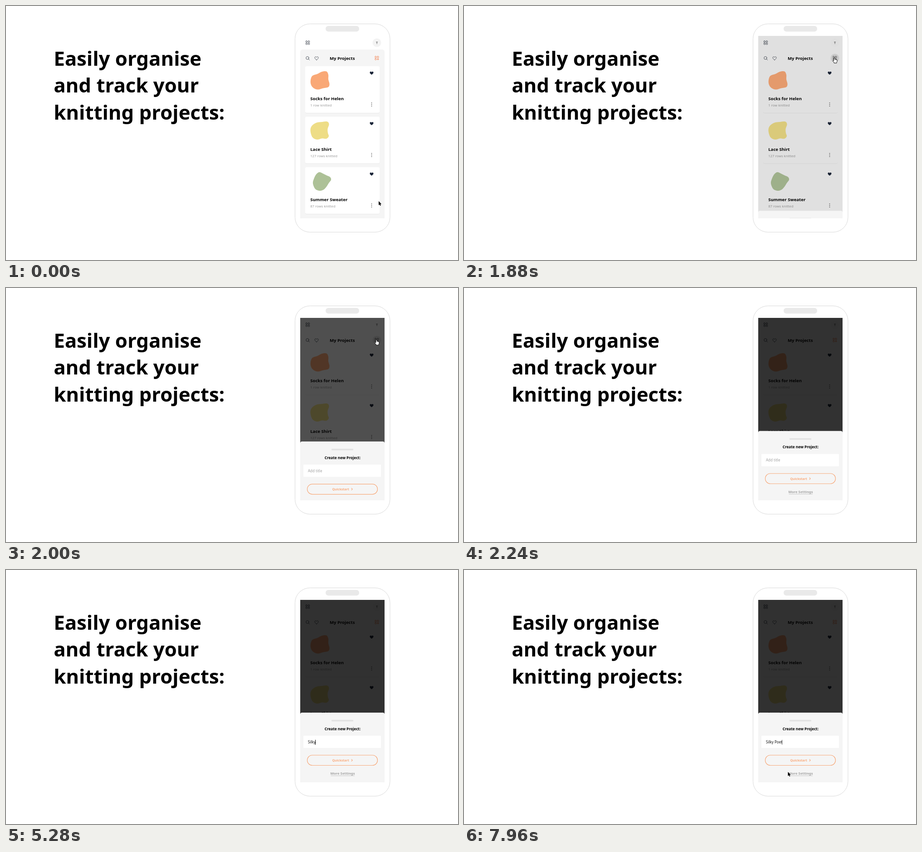
Animation of 997x561 px, one loop 8000 ms. Source, as an HTML page:

```html
<!DOCTYPE html>
<html lang="en">
<head>
<meta charset="utf-8">
<title>Knitting projects</title>
<style>
  html, body { margin: 0; width: 100%; height: 100%; overflow: hidden; background: #fff; }
  svg { display: block; width: 997px; height: 561px; font-family: "Noto Sans", "Open Sans", sans-serif; --paper: #fff; }
  text { white-space: pre; }
  .headline { font-size: 43.75px; font-weight: 700; }
  .name { font-size: 9.6px; font-weight: 600; }
  .rows { font-size: 7.7px; fill: #9c9c9c; }
  .paper { fill: var(--paper); }
  .line { fill: none; stroke: #444b55; stroke-width: .9; stroke-linecap: round; stroke-linejoin: round; }
  .mid { text-anchor: middle; }
  .hand, .arrow { stroke-linejoin: round; }
</style>
</head>
<body>
<svg viewBox="0 0 997 561" xmlns="http://www.w3.org/2000/svg">
  <defs>
    <clipPath id="screen"><rect x="649" y="66" width="186" height="403"/></clipPath>
    <path id="heart" d="M0 3.6C-2.6 1.6-4 .3-4-1.3-4-3.9-1.2-4.3 0-2.3 1.2-4.3 4-3.9 4-1.3 4 .3 2.6 1.6 0 3.6z"/>
  </defs>
  <g class="headline">
    <text x="105.2" y="131.5">Easily organise</text>
    <text x="105.2" y="191.3">and track your</text>
    <text x="105.2" y="251.2">knitting projects:</text>
  </g>
  <rect x="637.5" y="39.5" width="209.5" height="460" rx="33" fill="#fff" stroke="#dadada"/>
  <rect x="705" y="44" width="74" height="12.5" rx="6" fill="#e9e9e9"/>
  <g clip-path="url(#screen)">
    <rect class="paper" x="649" y="66" width="186" height="403"/>
    <path d="M649 469V102q0-6 6-6h174q6 0 6 6V469z" fill="#f5f5f5"/>
    <g class="line" id="menu" transform="translate(665.5 81)"></g>
    <circle cx="818" cy="81" r="9.5" fill="#f3f3f3"/>
    <text class="mid" x="818" y="83.7" font-size="7.5" font-weight="500" fill="#222">T</text>
    <g class="line">
      <circle cx="664.9" cy="114.8" r="3.2"/>
      <path d="M667.3 117.2l2.2 2.2"/>
      <use href="#heart" x="685" y="115.6"/>
    </g>
    <text class="name mid" x="741.7" y="118.7">My Projects</text>
    <circle id="hover" cx="818" cy="115" r="9.5" fill="#ddd"/>
    <g class="line" id="add" transform="translate(818 115)"></g>
    <g id="cards"></g>
    <rect id="shade" x="649" y="66" width="186" height="403"/>
    <g id="sheet">
      <path d="M649 472V319q0-4 4-4h178q4 0 4 4V472z" fill="#f5f5f5"/>
      <rect x="718" y="331" width="48" height="3.5" rx="1" fill="#e3e3e3"/>
      <text class="mid" x="742.5" y="353.6" font-size="8.2" font-weight="600">Create new Project:</text>
      <rect x="656" y="366" width="171" height="27" rx="1" fill="#fff"/>
      <text id="entry" x="666" y="382.7" font-size="8"></text>
      <rect id="caret" y="375" width="1" height="11"/>
      <rect id="button" x="664.5" y="409" width="155" height="22.5" rx="11.2" stroke="#f7aa7c" stroke-width="1.2"/>
      <text x="719.5" y="422.8" font-size="7" font-weight="600" fill="#f9ab7d">Quickstart</text>
      <path d="M761.8 417.8l2.3 2.4-2.3 2.4" fill="none" stroke="#f7a474" stroke-width="1.1"/>
      <text class="mid" x="742.5" y="452" font-size="7.8" font-weight="600" fill="#a3a3a3">More Settings</text>
      <path d="M716.5 454.5h52.5" stroke="#bbb" stroke-width=".8"/>
    </g>
  </g>
  <g id="cursor">
    <path class="arrow" d="M0 0V9L2 7.2 3.3 10.2 4.9 9.5 3.6 6.6H6.3z" stroke="#fff" stroke-width=".6" paint-order="stroke"/>
    <path class="hand" d="M-1.2.8Q0-.8 1.1.8V4Q2 3 3 4.2 4.1 3.6 4.7 4.8 6 4.6 6 6V8.3Q5.5 9.5 5 10.3V12H-.8V10.8L-3.6 7.2Q-3.4 5.7-1.2 6.8z" fill="#fff" stroke="#111"/>
    <path class="beam" d="M-2.5-5.5Q-.2-5.5 0-4.5 .2-5.5 2.5-5.5M0-4.5V4.5M-2.5 5.5Q-.2 5.5 0 4.5 .2 5.5 2.5 5.5M-1.2 1.5H1.2" fill="none" stroke="#111" stroke-width="1.1"/>
  </g>
</svg>
<script>
const LOOP = 8000, STEP = 40;
const $ = id => document.getElementById(id);
const clamp = v => Math.max(0, Math.min(1, v));
const ramp = (t, a, b) => clamp((t - a) / (b - a));
const ease = p => p * p * (3 - 2 * p);
const mix = (a, b, p) => a + (b - a) * p;

// Smooth closed curve through x, y pairs
function blob(points) {
  const n = points.length / 2;
  const at = i => { const k = (i + n) % n * 2; return [points[k], points[k + 1]]; };
  let d = "M" + at(0);
  for (let i = 0; i < n; i++) {
    const [a, b, c, e] = [at(i - 1), at(i), at(i + 1), at(i + 2)];
    const out = b.map((v, k) => v + (c[k] - a[k]) / 6);
    const into = c.map((v, k) => v - (e[k] - b[k]) / 6);
    d += `C${out} ${into} ${c}`;
  }
  return d + "z";
}

const projects = [
  { name: "Socks for Helen", rows: "1 row knitted", fill: "#f9a876",
    shape: [12, 30, 16, 21, 27, 17, 37, 12, 47, 11.5, 51, 19, 51, 29, 53.5, 39, 51, 46, 40, 48.5, 28, 51.5, 18, 48, 12.5, 40] },
  { name: "Lace Shirt", rows: "127 rows knitted", fill: "#eedd86",
    shape: [11.5, 31.5, 14, 21, 24, 13.5, 38, 11.5, 49, 11, 52.5, 17, 49.5, 27, 50, 36, 52, 43, 47, 48.5, 37, 48, 26, 50.5, 16, 45.5] },
  { name: "Summer Sweater", rows: "87 rows knitted", fill: "#adc197",
    shape: [17, 36, 19, 26, 24, 16, 31, 11, 39, 14, 47, 18, 55, 22, 57, 28, 52, 35, 47, 43, 40, 50, 31, 52, 22, 48] }
];
$("cards").innerHTML = projects.map((p, i) => `
  <g transform="translate(660 ${133 + i * 111.5})">
    <rect y=".8" width="164" height="103.2" rx="3" fill="#e9e9e9"/>
    <rect class="paper" width="164" height="103" rx="3"/>
    <path d="${blob(p.shape)}" fill="${p.fill}"/>
    <use href="#heart" x="146.5" y="15.2" fill="#1b2538"/>
    <text class="name" x="11.2" y="75.2">${p.name}</text>
    <text class="rows" x="11.2" y="89">${p.rows}</text>
    ${[81, 84.5, 88].map(y => `<circle cx="146.5" cy="${y}" r=".85" fill="#333"/>`).join("")}
  </g>`).join("");

const tile = (x, y) => `<rect x="${x}" y="${y}" width="3.2" height="3.2" rx=".8"/>`;
const tiles = tile(-4.1, -3.9) + tile(.9, -3.9) + tile(-4.1, .9);
$("menu").innerHTML = tiles + tile(.9, .9);
$("add").innerHTML = tiles + '<path d="M2.5 .5V4.5M.5 2.5H4.5"/>';

const title = "Silky Poet";
const keyTimes = [4240, 4560, 4800, 4960, 5280, 5360, 5680, 5920, 6080, 6320];

function caretAlpha(t) {
  if (t < 3400) return 0;
  if (t < 4240) return 1 - ramp(t, 3880, 4080);
  if (t < 7200) return 1 - ramp(t, 6800, 7000);
  return ramp(t, 7360, 7520) - ramp(t, 7880, 8080);
}

// Pointer moves: visible from, until, move start, move end, x0, y0, x1, y1
const moves = [
  [0, 1160, 480, 560, 822, 431, 829, 391],
  [1160, 2120, 1160, 1560, 829, 391, 817, 114],
  [2400, 4240, 2760, 3240, 803, 286, 714, 383],
  [7240, LOOP, 7200, 7960, 714, 383, 714.5, 446]
];

function drawCursor(t, open) {
  const move = moves.find(m => t >= m[0] && t < m[1]);
  $("cursor").style.display = move ? "" : "none";
  if (!move) return "";
  const [, , start, end, x0, y0, x1, y1] = move;
  const p = ease(ramp(t, start, end));
  const x = mix(x0, x1, p), y = mix(y0, y1, p);
  const overAdd = t < 2400 && y < 125;
  const overButton = open > .9 && y > 409 && y < 431;
  const overField = open > .9 && y > 366 && y < 393;
  const kind = overAdd || overButton ? "hand" : overField ? "beam" : "arrow";
  for (const shape of $("cursor").children)
    shape.style.display = shape.classList.contains(kind) ? "" : "none";
  $("cursor").setAttribute("transform", `translate(${x} ${y})`);
  return overAdd ? "add" : overButton ? "button" : "";
}

function render(time) {
  const t = Math.floor(time % LOOP / STEP) * STEP;
  const open = t < 1880 ? 0 : t >= 2400 ? 1 : 1 - Math.exp(-.0145 * (t - 1872));
  const over = drawCursor(t, open);

  document.querySelector("svg").style.setProperty("--paper", open ? "#f5f5f5" : "#fff");
  $("shade").setAttribute("opacity", .8 * open);
  $("sheet").setAttribute("transform", `translate(0 ${154 * (1 - open)})`);
  $("hover").style.display = over === "add" ? "" : "none";
  $("add").style.stroke = over === "add" ? "#555" : "#f28a5c";
  $("button").setAttribute("fill", over === "button" ? "#f6efea" : "#f5f5f5");

  const typed = title.slice(0, keyTimes.filter(k => t >= k).length);
  const entry = $("entry");
  entry.textContent = typed || "Add title";
  entry.setAttribute("fill", typed ? "#111" : "#a0a0a0");
  const width = typed ? entry.getComputedTextLength() - .8 : 0;
  $("caret").setAttribute("x", 666 + Math.round(width));
  $("caret").setAttribute("opacity", caretAlpha(t));
}

function tick() {
  render(performance.now());
  requestAnimationFrame(tick);
}
tick();
</script>
</body>
</html>
```
